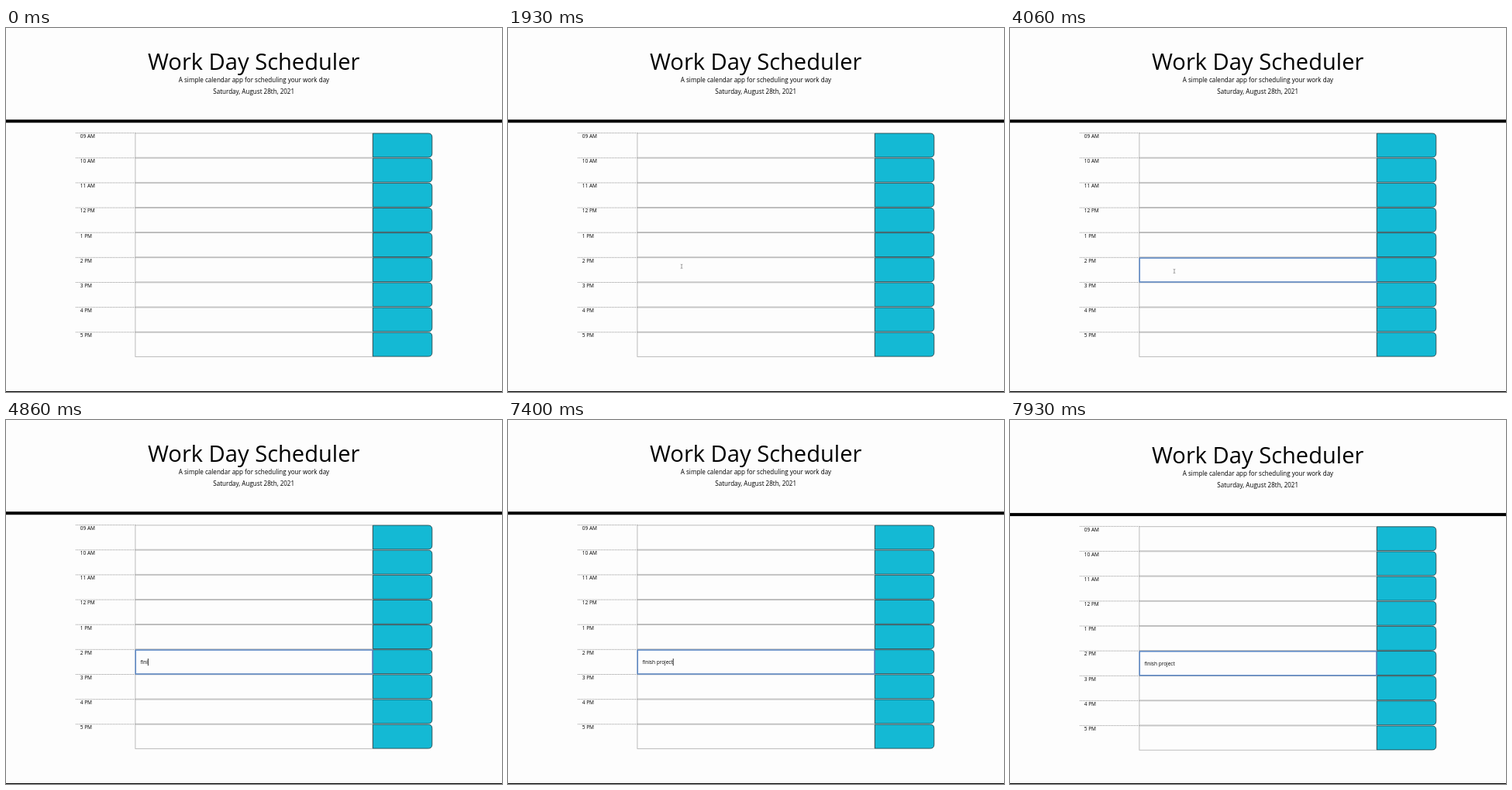
Write an HTML page that moves like this. It is 640x470 px and loops after 8000 ms.

```html
<!DOCTYPE html>
<html lang="en">
<head>
<meta charset="utf-8">
<style>
  html, body { margin: 0; width: 100%; height: 100%; overflow: hidden; background: #fdfdfd; }
  svg { display: block; width: 640px; height: 470px; font-family: "Open Sans", sans-serif; }
  .header { text-anchor: middle; font-size: 8.07px; }
  .header .title { font-size: 29.1px; }
  .small { font-size: 6.5px; }
  .divider { stroke: #888; stroke-width: .9; stroke-dasharray: 1 1; }
  .field { fill: #fdfdfd; stroke: #b4b4b4; stroke-width: .9; }
  .save { fill: #14b9d4; stroke: #2b4a50; stroke-width: .9; }
</style>
</head>
<body>
<svg viewBox="0 0 640 470">
  <g id="page">
    <g class="header">
      <text class="title" x="319.7" y="54">Work Day Scheduler</text>
      <text x="320" y="70.4">A simple calendar app for scheduling your work day</text>
      <text x="319.7" y="84.9">Saturday, August 28th, 2021</text>
    </g>
    <rect y="118.3" width="640" height="4"/>
    <g id="rows"></g>
    <rect id="focus" x="167.2" y="297" width="305.8" height="31" rx=".6" fill="none" stroke="#5b88c6" stroke-width="1.5"/>
    <text id="task" class="small" x="173.4" y="315" xml:space="preserve"></text>
    <rect id="caret" y="308" width=".8" height="9.2"/>
  </g>
  <rect y="469" width="640" height="1"/>
  <path id="beam" d="M-1.3-2.6Q0-2.6 0-1.8Q0-2.6 1.3-2.6M0-1.8V1.8M-1.3 2.6Q0 2.6 0 1.8Q0 2.6 1.3 2.6" fill="none" stroke="#777" stroke-width=".7"/>
  <path id="hand" d="M-1.8-3.2Q-.8-3.8-.4-2.6L0-1.2L2-.8Q3-.5 2.8.8L2 3H-1L-2.8.6Q-2.6-.3-1.2.2Z" fill="#fff" stroke="#345" stroke-width=".6"/>
</svg>
<script>
const LOOP = 8000, FOCUS_AT = 2530, BLINK = 505;
const TASK = "finish project";
const KEY_TIMES = [4400, 4530, 4730, 4800, 5200, 5260, 5400, 6130, 6330, 6460, 6860, 7060, 7330, 7400];
const HOURS = ["09 AM", "10 AM", "11 AM", "12 PM", "1 PM", "2 PM", "3 PM", "4 PM", "5 PM"];

const [page, rows, focusRing, task, caret, beam, hand] =
  ["page", "rows", "focus", "task", "caret", "beam", "hand"].map(id => document.getElementById(id));

rows.innerHTML = HOURS.map((hour, i) => {
  const y = 135.9 + i * 32.15;
  return `<path class="divider" d="M90 ${y - .3}H167"/>
    <text class="small" x="95.8" y="${y + 6}">${hour}</text>
    <rect class="field" x="166.9" y="${y}" width="306.3" height="31.3"/>
    <path class="save" d="M473.4 ${y + .1}h71.4q5 0 5 5v20.9q0 5-5 5h-71.4z"/>`;
}).join("");

const show = (el, on) => el.setAttribute("visibility", on ? "visible" : "hidden");

function drawPointer(t) {
  const p = Math.min(1, Math.max(0, (t - 1400) / 600));
  const ease = p * p * (3 - 2 * p);
  const x = 540.5 - 328.5 * ease, y = 144 + 170 * ease;
  const present = t >= 1400 && t < KEY_TIMES[0], onButton = x > 473;
  show(hand, present && onButton);
  show(beam, present && !onButton);
  for (const el of [hand, beam]) el.setAttribute("transform", `translate(${x} ${y})`);
}

function drawTask(t) {
  const count = KEY_TIMES.filter(k => t >= k).length;
  const typed = TASK.slice(0, count);
  if (task.textContent !== typed) task.textContent = typed;
  const since = t - (count ? KEY_TIMES[count - 1] : FOCUS_AT);
  const width = count ? task.getComputedTextLength() : 0;
  caret.setAttribute("x", 173.4 + width);
  show(caret, since >= 0 && since % (2 * BLINK) < BLINK);
  show(focusRing, t >= FOCUS_AT);
}

function render(now) {
  const t = now % LOOP;
  drawPointer(t);
  drawTask(t);
  const bounce = t >= 7930 ? 1.8 : t >= 7860 ? 1 : 0;
  page.setAttribute("transform", `translate(0 ${bounce})`);
}

const start = performance.now();
(function tick() {
  render(performance.now() - start);
  requestAnimationFrame(tick);
})();
</script>
</body>
</html>
```
